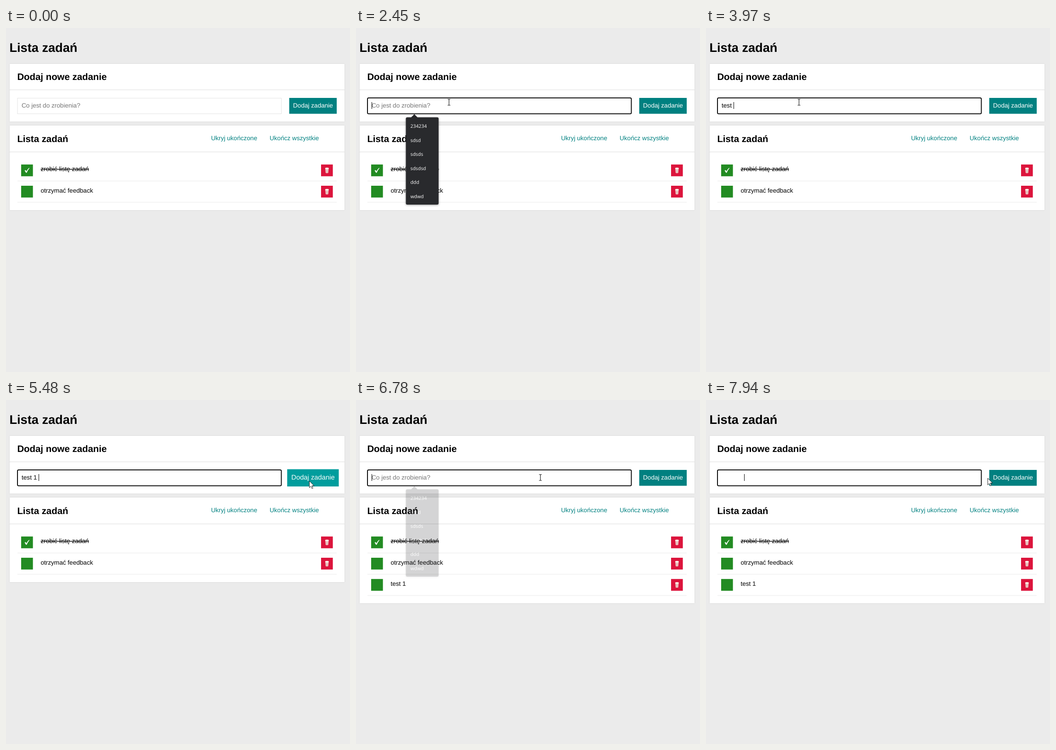
Animation of 749 by 748 pixels, one loop 8000 ms. Source, as an HTML page:

```html
<!DOCTYPE html>
<html lang="pl">
<head>
<meta charset="utf-8">
<title>Lista zadań</title>
<style>
  html, body { margin: 0; width: 100%; height: 100%; overflow: hidden; background: #ebebeb; }
  svg { display: block; width: 749px; height: 748px; }
  text {
    font: 13.6px "Liberation Sans", Arial, sans-serif;
    text-rendering: geometricPrecision;
    white-space: pre;
  }
  h1, .h1 { font-size: 27.2px; font-weight: bold; }
  .h2 { font-size: 20.4px; font-weight: bold; }
  .link { fill: teal; }
  .done { text-decoration: line-through; }
  .card { fill: #fff; filter: drop-shadow(0 0 1px #ccc); }
  .head { fill: #ddd; }
  .line { fill: #e9e9e9; }
  #popup text { font: 10.4px "Open Sans", "Noto Sans", sans-serif; fill: #fff; }
</style>
</head>
<body>
<svg viewBox="0 0 749 748">
  <defs>
    <g id="bin">
      <rect x="686" width="25.6" height="25.6" fill="crimson"/>
      <path d="M695.2 8.4L696 18.2Q698.8 19.4 701.6 18.2L702.6 8.4Z" fill="#f3dfd8"/>
      <ellipse cx="698.9" cy="8.2" rx="4" ry="1.5" fill="#fff3ea"/>
      <path d="M696.8 10.4l.4 7.4M698.9 10.6v7.6M701 10.4l-.4 7.4" stroke="#d98a90" stroke-width=".7"/>
    </g>
  </defs>

  <text class="h1" x="7.4" y="52">Lista zadań</text>
  <rect class="card" x="8" y="78" width="729" height="125.5"/>
  <text class="h2" x="24.4" y="113">Dodaj nowe zadanie</text>
  <rect class="head" x="8" y="134" width="729" height="1"/>

  <rect id="plain" x="25" y="152.5" width="574.5" height="34" fill="#fff" stroke="#e3e3e3"/>
  <rect id="ring" x="25" y="152" width="574.5" height="34.4" rx="2.5" fill="#fff" stroke="#101010" stroke-width="2"/>
  <text id="hint" x="34" y="173" fill="#757575">Co jest do zrobienia?</text>
  <text id="value" x="34" y="173"></text>
  <rect id="caret" y="161" width="1" height="15"/>

  <g id="button">
    <rect id="face" x="616.7" y="152" width="103.4" height="34.5"/>
    <text x="625" y="173" fill="#fff">Dodaj zadanie</text>
  </g>

  <rect id="list" class="card" x="8" y="212" width="729"/>
  <text class="h2" x="24.4" y="247.5">Lista zadań</text>
  <text class="link" x="446.5" y="244.3">Ukryj ukończone</text>
  <text class="link" x="574" y="244.3">Ukończ wszystkie</text>
  <rect class="head" x="8" y="269" width="729" height="1"/>
  <g id="rows"></g>

  <g id="popup">
    <path d="M119.5 195L127 187.2L134.5 195Z" fill="#292a2d"/>
    <rect x="108.6" y="194.3" width="71.2" height="189.7" rx="3" fill="#292a2d" style="filter:drop-shadow(0 1px 2px #0006)"/>
  </g>

  <path id="arrow" d="M0 0V14.6L3.4 11.5L5.7 16.6L7.9 15.6L5.7 10.6H10.4Z" fill="#fff" stroke="#111" stroke-width=".9"/>
  <path id="beam" d="M-3 -6.5H-.8L0 -6L.8 -6.5H3M0 -6V6M-3 6.5H-.8L0 6L.8 6.5H3" fill="none" stroke="#111" stroke-width="1.1"/>
</svg>
<script>
  const LOOP = 8000, TICK = 72.3, FIRST = 195, LAG = 25;
  const $ = id => document.getElementById(id);
  const clamp = p => Math.min(1, Math.max(0, p));
  const ramp = (t, start, span) => clamp((t - start) / span);
  const easeOut = p => 1 - (1 - p) ** 2.4;
  const show = (id, on) => { $(id).style.display = on ? '' : 'none'; };

  const tasks = ['zrobić listę zadań', 'otrzymać feedback', 'test 1'];
  $('rows').innerHTML = tasks.map((name, i) => `
    <g transform="translate(0 ${296.8 + i * 46.2})">
      <rect x="33" width="25.6" height="25.6" fill="forestgreen"/>
      ${i ? '' : '<path d="M40.6 13.2L42.5 11.9L44.3 14.6Q46.6 10.4 50.4 7.2L51.1 7.9Q47.4 12.4 45.1 17.9L43.6 18Z" fill="#fff"/>'}
      <text class="${i ? '' : 'done'}" x="75.4" y="14.5">${name}</text>
      <use href="#bin"/>
      <rect class="line" x="25" y="35.4" width="695" height="1"/>
    </g>`).join('');
  const lastRow = $('rows').lastElementChild;

  $('popup').innerHTML += ['234234', 'sdsd', 'sdsds', 'sdsdsd', 'ddd', 'wdwd']
    .map((s, i) => `<text x="118.5" y="${217 + i * 30.5}">${s}</text>`).join('');

  // [time, field content]; each entry also restarts the caret blink
  const typing = [
    [1440, ''], [2600, 't'], [2880, 'te'], [3320, 'tet'], [3450, 'te'], [3600, 'tes'],
    [3750, 'test'], [3970, 'test '], [4190, 'test 1'], [4320, 'test 1 '],
    [5575, ''], [6775, ''], [6970, ' ']
  ];
  const REPEAT = 7440, ADDED = 5575;

  // [time, x, y] of the pointer
  const path = [
    [210, 628, 648], [700, 210, 178], [845, 210, 178], [1010, 202, 161], [4745, 202, 161],
    [5320, 660, 176], [5960, 660, 176], [6430, 398, 168], [6580, 401, 168],
    [7230, 401, 168], [7380, 470, 164], [7600, 593, 168], [7940, 613, 170]
  ];

  function pointer(t) {
    const i = path.findIndex(k => k[0] > t);
    if (i < 0) return path[path.length - 1].slice(1);
    const [a, b] = [path[Math.max(0, i - 1)], path[i]];
    const p = (1 - Math.cos(Math.PI * ramp(t, a[0], b[0] - a[0]))) / 2;
    return [1, 2].map(n => a[n] + (b[n] - a[n]) * p);
  }

  const ADVANCE = { e: .556, s: .5, 1: .556 };
  const textWidth = s => [...s].reduce((w, c) => w + (ADVANCE[c] || .278), 0) * 13.6;

  function drawField(t) {
    const focused = t >= 1365;
    let [last, text] = typing.filter(k => k[0] <= t).pop() || [Infinity, ''];
    if (t >= REPEAT) {
      text = ' '.repeat(Math.min(13, 1 + Math.floor((t - REPEAT) / 41)));
      last = t;
    }
    show('plain', !focused);
    show('ring', focused);
    show('hint', !text);
    $('value').textContent = text;
    show('caret', last <= t && Math.floor((t - last) / 500) % 2 === 0);
    $('caret').setAttribute('x', Math.round(34 + textWidth(text)));
  }

  function drawPopup(t) {
    const [open, close] = t < 5000 ? [1360, 2590] : [6770, 6970];
    const gone = ramp(t, close, 260);
    const alpha = ramp(t, open, 150) * (1 - gone);
    show('popup', alpha > 0);
    $('popup').setAttribute('opacity', alpha);
    const s = 1 - .045 * gone;
    $('popup').setAttribute('transform', `translate(144.2 289) scale(${s}) translate(-144.2 -289)`);
  }

  function drawButton(t) {
    const hover = easeOut(ramp(t, 5220, 500)) * (1 - easeOut(ramp(t, 5980, 500)));
    const c = Math.round(128 + 34 * hover);
    $('face').setAttribute('fill', `rgb(0,${c},${c})`);
    $('button').setAttribute('transform',
      `translate(668.4 169.2) scale(${1 + .1 * hover}) translate(-668.4 -169.2)`);
  }

  function drawPointer(t) {
    const [x, y] = pointer(t).map(Math.round);
    const inField = x > 25 && x < 600 && y > 152 && y < 187;
    show('beam', t >= 210 && inField);
    show('arrow', t >= 210 && !inField);
    $('beam').setAttribute('transform', `translate(${x + .5} ${y + .5})`);
    $('arrow').setAttribute('transform', `translate(${x + .5} ${y})`);
  }

  function draw(now) {
    const t = FIRST + LAG + Math.floor((now % LOOP - FIRST) / TICK) * TICK;
    drawField(t);
    drawPopup(t);
    drawButton(t);
    drawPointer(t);
    const added = t >= ADDED;
    $('list').setAttribute('height', added ? 230 : 184);
    lastRow.style.display = added ? '' : 'none';
  }

  let start;
  function frame(now) {
    start ??= now;
    draw(now - start);
    requestAnimationFrame(frame);
  }
  draw(0);
  requestAnimationFrame(frame);
</script>
</body>
</html>
```
